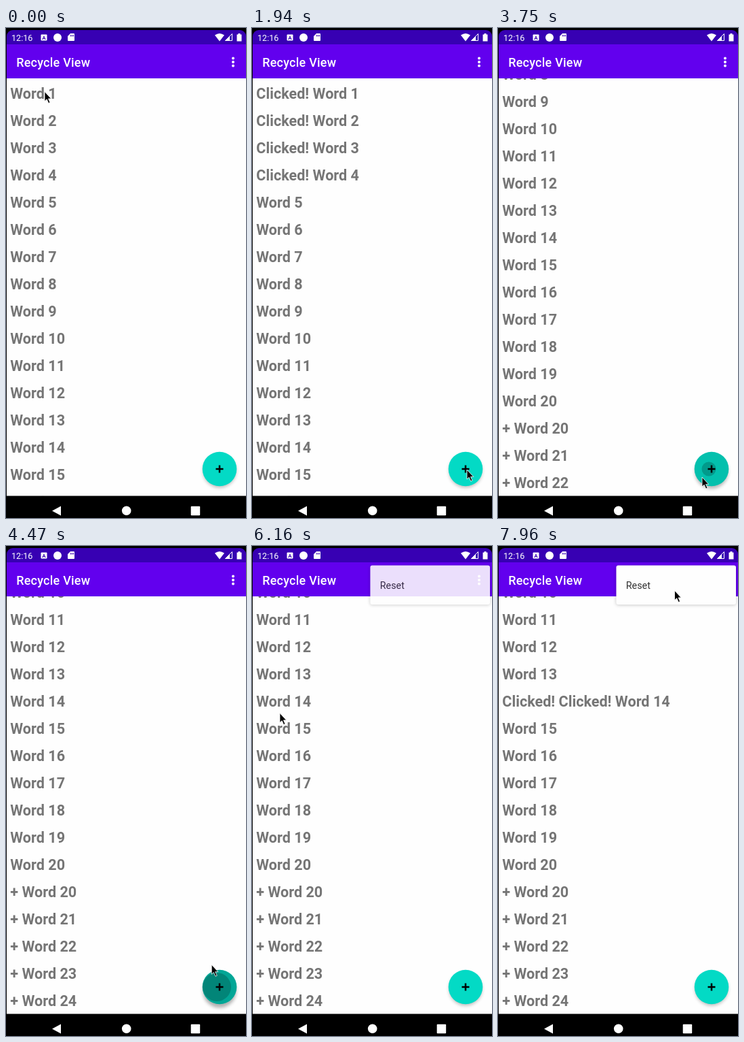
Animation, 354 px wide and 720 px high, one loop 8000 ms. Source, as an HTML page:

```html
<!DOCTYPE html>
<html lang="en">
<head>
<meta charset="utf-8">
<title>Recycle View</title>
<style>
html, body { margin: 0; width: 100%; height: 100%; overflow: hidden; background: #000; }
svg { display: block; width: 354px; height: 720px; font-family: Roboto, sans-serif; }
#rows { font-size: 21.6px; font-weight: 700; fill: #757575; }
</style>
</head>
<body>
<svg viewBox="0 0 354 720">
  <defs>
    <clipPath id="page"><rect x="1" y="74" width="353" height="613.5"/></clipPath>
    <filter id="blur" x="-30%" y="-30%" width="160%" height="160%"><feGaussianBlur stdDeviation="2.5"/></filter>
  </defs>

  <rect x="1" y="3" width="353" height="40" rx="9" fill="#3700b3"/>
  <rect x="1" y="24" width="353" height="50" fill="#6200ee"/>
  <rect x="1" y="74" width="353" height="613.5" fill="#fefefe"/>

  <g fill="#fff">
    <text x="8" y="18.5" font-size="12.6">12:16</text>
    <rect x="51.5" y="9.5" width="9" height="9" rx="1"/>
    <text x="56" y="17" font-size="8" font-weight="700" text-anchor="middle" fill="#3700b3">A</text>
    <circle cx="76" cy="14" r="6"/>
    <path d="M95 8h5q1 0 1 1v9q0 1-1 1h-8q-1 0-1-1v-6z"/>
    <path d="M95.5 10v2.5M97.5 10v2.5M99.5 10v2.5" stroke="#3700b3"/>
    <path d="M308 10.5Q315 5.5 322 10.5L315 19.5z"/>
    <path d="M333.5 8.5v10h-10z" fill="none" stroke="#fff"/>
    <path d="M330 12v7h-7z"/>
    <path d="M340.5 9.5h2v-1.5h3v1.5h2v10h-7z"/>
    <text x="15.2" y="56.5" font-size="18" font-weight="500" letter-spacing=".225">Recycle View</text>
    <circle cx="335" cy="44.5" r="2"/><circle cx="335" cy="50" r="2"/><circle cx="335" cy="55.5" r="2"/>
    <path d="M81 702.5v14l-13-7z"/>
    <circle cx="177.7" cy="709.2" r="6.8"/>
    <rect x="272.7" y="702.7" width="13.5" height="13.5" rx="1"/>
  </g>
  <circle id="tap" cx="335" cy="50" r="17" fill="#fff" opacity=".2"/>

  <g clip-path="url(#page)">
    <g id="rows"></g>
    <path id="glow" d="M1 688V664.5Q180 657 354 686V688z" fill="#6200ee"/>
    <circle id="shade" cx="315" r="24.5" filter="url(#blur)"/>
    <circle cx="315" cy="648" r="25.3" fill="#03dac5"/>
    <circle id="dim" cx="315" cy="648" r="25.3"/>
    <circle id="ripple" cx="311" cy="648" opacity=".2"/>
    <path d="M309.5 648h11M315 642.5v11" stroke="#000" stroke-width="2.5"/>
  </g>

  <g id="menu">
    <rect x="174" y="30" width="177" height="57" rx="3" opacity=".2" filter="url(#blur)"/>
    <rect x="174.4" y="28.4" width="176.6" height="57.6" rx="3" fill="#fefefe"/>
    <text x="188.8" y="63" font-size="14.3" fill="#333">Reset</text>
  </g>

  <path id="cursor" d="M0 0V14L3.2 11.2L5.7 17L8 16L5.5 10.4H9.7z" stroke="#fff" stroke-width=".8"/>
</svg>
<script>
const $ = id => document.getElementById(id);
const set = (id, attrs) => { for (const a in attrs) $(id).setAttribute(a, attrs[a]); };
const clamp = v => Math.max(0, Math.min(1, v));
const ease = v => { v = clamp(v); return v * v * (3 - 2 * v); };

const TICK = 120.6;
const moves = [ // start, end, x, y
  [0, 2, 57, 98], [4, 10, 57, 222], [12, 16, 317, 649], [19, 23, 87, 289],
  [24, 28, 301, 660], [36, 42, 331, 56], [45, 50, 41, 245.5], [52, 54, 55, 230],
  [56, 59, 344, 57], [59, 62, 335, 47], [63, 66, 260.5, 65.5]
];
const addTicks = [18, 29, 31, 34, 36];
const fade = (k, from, to) => Math.min(clamp((k - from) * .6), clamp((to - k) * .88));

const rows = Array.from({ length: 25 }, (_, i) => {
  const row = document.createElementNS('http://www.w3.org/2000/svg', 'text');
  row.setAttribute('x', 6.3);
  row.setAttribute('y', 103.6 + 40 * i);
  $('rows').append(row);
  return row;
});

function cursorAt(k) {
  let x = 57, y = 93.5;
  for (const [from, to, toX, toY] of moves) {
    const f = ease((k - from) / (to - from));
    x += (toX - x) * f;
    y += (toY - y) * f;
  }
  return [x, y];
}

function clicksOn(word, k) {
  if (word <= 4) return k >= Math.round(1.4 + 2.6 * word) ? 1 : 0;
  return word === 14 ? 2 * clamp((k - 52) / 2) : 0;
}

function draw(k) {
  const added = addTicks.filter(n => n <= k);
  const scroll = (188 + 40 * added.length) * ease((k - 18) / 3);
  set('rows', { transform: `translate(0 ${-scroll})` });
  rows.forEach((row, i) => {
    const label = i < 20 ? 'Clicked! '.repeat(clicksOn(i + 1, k)) + 'Word ' + (i + 1) : '+ Word ' + i;
    if (row.textContent !== label) row.textContent = label;
    row.setAttribute('visibility', i < 20 + added.length ? 'visible' : 'hidden');
  });

  const age = added.length ? k - added.at(-1) : 9;
  const press = age < 2 ? (age + 1) / 2 : 0;
  set('dim', { opacity: .24 * press });
  set('ripple', { r: 21 * press });
  set('shade', { cy: 651 + 3 * press, opacity: .25 + .05 * press });

  set('glow', { opacity: k < 24 ? .05 * Math.max(0, k - 21) : 0 });
  set('tap', { visibility: k === 44 || k === 62 ? 'visible' : 'hidden' });
  set('menu', { opacity: Math.max(fade(k, 44, 52), fade(k, 62, 70)) });
  set('cursor', { transform: `translate(${cursorAt(k)})` });
}

function loop() {
  draw(Math.floor(performance.now() % 8000 / TICK));
  requestAnimationFrame(loop);
}
loop();
</script>
</body>
</html>
```
